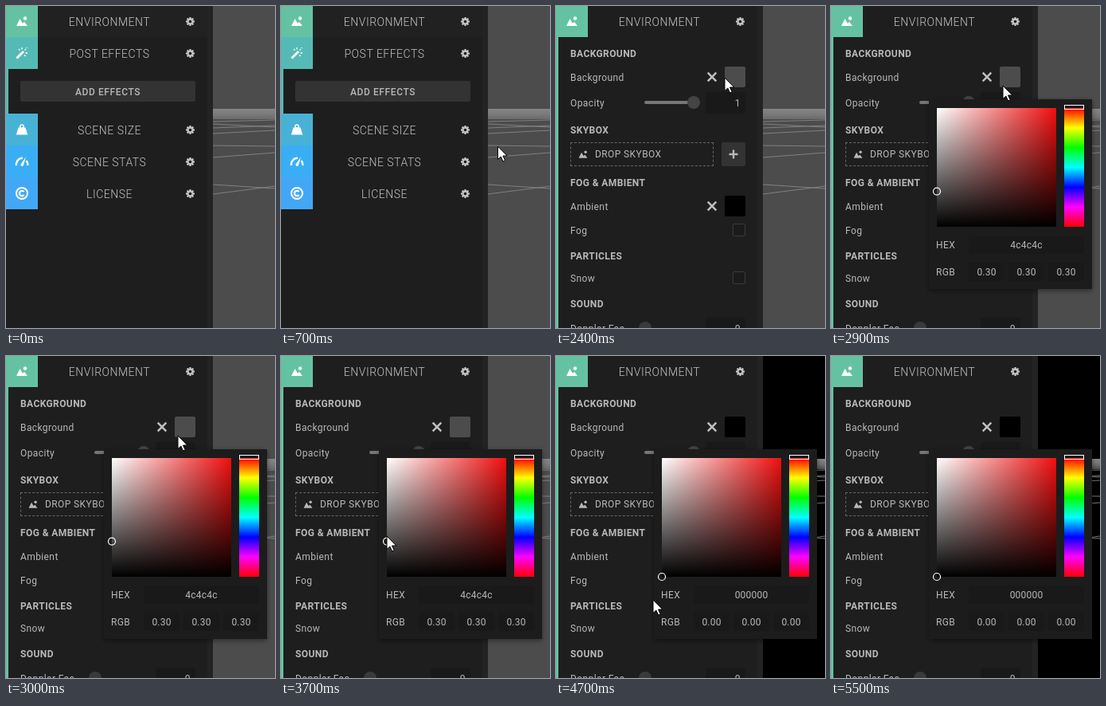
These frames come from a looping animation (338x404 px, 5900 ms). An HTML page:

```html
<!DOCTYPE html>
<html>
<head>
<meta charset="utf-8">
<style>
html, body { margin: 0; width: 100%; height: 100%; overflow: hidden; background: #1e1e1e; }
svg { display: block; }
text { font: 12px Roboto, sans-serif; letter-spacing: .4px; fill: #b8b8b8; }
.row { font-size: 14px; font-weight: 300; letter-spacing: .5px; text-anchor: middle; fill: #c4c4c4; }
.head { font-weight: 700; }
.btn { font-weight: 500; letter-spacing: .6px; text-anchor: middle; }
.num { text-anchor: middle; letter-spacing: .2px; }
.end { text-anchor: end; }
</style>
</head>
<body>
<svg id="stage" width="338" height="404" viewBox="0 0 338 404"></svg>
<script>
const LOOP = 5900, STEP = 100;

const rect = (x, y, w, h, fill, extra = '') =>
  `<rect x="${x}" y="${y}" width="${w}" height="${h}" fill="${fill}" ${extra}/>`;
const text = (x, y, str, cls = '', extra = '') =>
  `<text x="${x}" y="${y}" class="${cls}" ${extra}>${str}</text>`;
const line = (d, color, width, extra = '') =>
  `<path d="${d}" fill="none" stroke="${color}" stroke-width="${width}" ${extra}/>`;
const at = (x, y, body, scale = 1) =>
  `<g transform="translate(${x} ${y}) scale(${scale})">${body}</g>`;
const field = (x, y, w, h) => rect(x, y, w, h, '#191919', 'rx="2"');
const gradient = (id, axis, stops) =>
  `<linearGradient id="${id}" x1="0" y1="0" x2="${axis === 'x' ? 1 : 0}" y2="${axis === 'y' ? 1 : 0}">` +
  stops.map(([color, alpha = 1], i) =>
    `<stop offset="${i / (stops.length - 1)}" stop-color="${color}" stop-opacity="${alpha}"/>`).join('') +
  '</linearGradient>';

const teeth = [0, 45, 90, 135].map(a =>
  rect(-1.1, -5.5, 2.2, 3, '#c4c4c4', `transform="rotate(${a})"`) +
  rect(-1.1, 2.5, 2.2, 3, '#c4c4c4', `transform="rotate(${a})"`)).join('');
const gear = y => at(231.5, y + .5,
  '<circle r="3" fill="none" stroke="#c4c4c4" stroke-width="2.4"/>' + teeth);
const cross = y => line(`M190.7 ${y - 5.3}l10.6 10.6m0-10.6l-10.6 10.6`, '#c0c0c0', 2.5);
const checkbox = y => rect(222.5, y + .5, 15, 15, '#1b1b1b', 'rx="1.5" stroke="#3a3a3a"');

const peaks = color =>
  `<path d="M-7 6L-2.5-3L1 3L3 .8L7 6Z" fill="${color}"/><circle cx="4" cy="-3.5" r="2.2" fill="${color}"/>`;
const wand = line('M-6.5 6.5L2-2', '#fff', 3) +
  line('M3.5-3.5L5-5M0-7v2.5M-4-5l1.5 1.5M4.5 0h2.5M3 2.5l1.5 1.5M6-7v1', '#fff', 1.3);
const weight = '<path d="M-4.5-2.5H4.5L7.2 6.5H-7.2Z" fill="#fff"/>' +
  '<circle cy="-3.8" r="2.2" fill="none" stroke="#fff" stroke-width="1.6"/>';
const gauge = line('M-7 5A8 8 0 0 1 1-4.2M5.5-1A8 8 0 0 1 7.4 5', '#fff', 2.4) +
  '<path d="M-1.8 4L5-5.5L1.8 5.2Q-.5 7-1.8 4Z" fill="#fff"/>';
const copyright = '<circle r="7" fill="none" stroke="#fff" stroke-width="2"/>' +
  line('M2.6-2A3.2 3.2 0 1 0 2.6 2', '#fff', 2.3);

const row = (y, label, color, icon) =>
  rect(0, y, 40, 40, color) + at(20, y + 20, icon) + text(130, y + 26, label, 'row') + gear(y + 20);

const viewport =
  '<rect id="back" x="260" width="78" height="404"/>' +
  rect(260, 129, 78, 13, 'url(#haze)') +
  line('M260 145L338 143M260 148L338 152M260 153L338 150M260 160L338 156' +
       'M260 175L338 176M260 190L338 184M260 236L338 226M260 224L338 229', '#868686', .9);

const panel = rect(0, 0, 260, 404, '#1e1e1e') + rect(253, 0, 7, 404, '#232323');

const closed =
  rect(40, 0, 213, 39, '#212121') +
  row(-1, 'ENVIRONMENT', '#64c2a3', peaks('#fff')) +
  row(39, 'POST EFFECTS', '#55bab5', wand) +
  rect(0, 79, 3, 56, '#55bab5') +
  rect(18, 94, 220, 26, '#333', 'rx="2"') + text(128, 111.5, 'ADD EFFECTS', 'btn') +
  row(135, 'SCENE SIZE', '#48b2d6', weight) +
  row(175, 'SCENE STATS', '#3aaef4', gauge) +
  row(215, 'LICENSE', '#42a8f5', copyright);

const dropBox =
  line('M18 171.5H198M18 200.5H198', '#666', 1, 'stroke-dasharray="3 2.06"') +
  line('M18.5 171V201M197.5 171V201', '#666', 1, 'stroke-dasharray="3 2.4"');

const open =
  row(-1, 'ENVIRONMENT', '#64c2a3', peaks('#fff')) +
  rect(0, 39, 3, 365, '#64c2a3') +
  [['BACKGROUND', 64], ['SKYBOX', 160], ['FOG &amp; AMBIENT', 226], ['PARTICLES', 318], ['SOUND', 378]]
    .map(([s, y]) => text(18, y, s, 'head')).join('') +
  [['Background', 94], ['Opacity', 126], ['Ambient', 256], ['Fog', 286], ['Snow', 346], ['Doppler Fac', 409]]
    .map(([s, y]) => text(18, y, s)).join('') +
  cross(89) + '<rect id="swatch" x="212" y="76" width="26" height="26" rx="2"/>' +
  rect(111, 119, 62, 4, '#777', 'rx="2"') + '<circle cx="173" cy="121" r="8" fill="#444"/>' +
  field(188, 108, 50, 27) + text(232, 126, '1', 'end') +
  dropBox + at(34, 186, peaks('#b8b8b8'), .78) + text(49, 190, 'DROP SKYBOX') +
  rect(208, 171, 30, 30, '#333', 'rx="2"') + line('M217.5 186h11m-5.5-5.5v11', '#b8b8b8', 2.4) +
  cross(251) + rect(212, 238, 26, 26, '#000', 'rx="2"') +
  checkbox(273) + checkbox(333) +
  '<circle cx="112" cy="404" r="8" fill="#3a3a3a"/>' +
  field(188, 391, 50, 27) + text(232, 409, '0', 'end');

const picker =
  rect(123, 117, 205, 238, '#1c1c1c', 'filter="url(#shadow)"') +
  rect(133, 128, 150, 149, '#f00f0f') + rect(133, 128, 150, 149, 'url(#white)') +
  rect(133, 128, 150, 149, 'url(#black)') +
  rect(293, 128, 25, 149, 'url(#hue)') +
  rect(293.5, 124.5, 24, 5, 'none', 'stroke="#fff"') +
  '<circle id="ring" cx="133" r="4.5" fill="none" stroke="#fff" stroke-width="1.2"/>' +
  text(132, 304, 'HEX') + field(173, 288, 145, 23) + text(245.5, 304, '', 'num', 'id="hex"') +
  text(132, 338, 'RGB') +
  [173, 223, 273].map(x => field(x, 322, 45, 23) + text(x + 22.5, 338, '', 'num rgb')).join('');

const arrow = '<path id="arrow" d="M0 0V16.5L3.8 13L6.6 19L9.2 17.8L6.5 12H11.8Z" fill="#fff" stroke="#000"/>';
const hand = '<path id="hand" d="M-1.5 12V1.2Q-1.5-1 .5-1T2.5 1.2V6.5Q5 5.5 5.7 7.3Q8 6.6 8.6 8.6' +
  'Q10.8 8.2 10.8 10.5V15Q10.8 18 9 20V22.5H-1V20Q-4 17-6.6 12.6Q-7.3 10.4-5 10.2Q-3.5 10.3-1.5 12Z' +
  'M2.5 6.5V11M5.7 7.3V11M8.6 8.6V11.5" fill="#fff" stroke="#000"/>';

const stage = document.getElementById('stage');
stage.innerHTML = '<defs>' +
  gradient('haze', 'y', [['#858585'], ['#808080', .9], ['#808080', .6]]) +
  gradient('white', 'x', [['#fff'], ['#fff', 0]]) +
  gradient('black', 'y', [['#000', 0], ['#000']]) +
  gradient('hue', 'y', ['#f00', '#ff0', '#0f0', '#0ff', '#00f', '#f0f', '#f00'].map(c => [c])) +
  '<filter id="shadow"><feDropShadow dx="0" dy="2" stdDeviation="3" flood-opacity=".45"/></filter></defs>' +
  viewport + panel +
  `<g id="closed">${closed}</g><g id="open">${open}</g><g id="picker">${picker}</g>` +
  `<g id="cursor">${arrow}${hand}</g>`;

const el = Object.fromEntries([...stage.querySelectorAll('[id]')].map(e => [e.id, e]));
const channels = stage.querySelectorAll('.rgb');
const show = (node, on) => node.setAttribute('display', on ? 'inline' : 'none');

// time, pointer x, pointer y
const path = [
  [0, 350, 400], [100, 330, 372], [600, 300, 214], [1100, 162, 24], [1700, 162, 24],
  [2400, 212, 90], [2600, 216, 100], [3000, 216, 100], [3300, 195, 194], [3700, 133, 226],
  [3900, 132, 229], [4200, 118, 268], [4500, 108, 290], [5100, 150, 338], [5400, 165, 392],
  [5500, 170, 430], [LOOP, 170, 430]
];

function pointer(t) {
  const i = path.findIndex(p => p[0] > t);
  const [a, b] = [path[i - 1], path[i]];
  const k = (t - a[0]) / (b[0] - a[0]);
  return [1, 2].map(n => a[n] + (b[n] - a[n]) * k);
}

function draw(now) {
  const t = Math.floor(now % LOOP / STEP) * STEP;
  const opened = t >= 1500;
  const level = Math.round(76 - 45 * Math.min(76 / 45, Math.max(0, (t - 3900) / 300)));
  const hex = level.toString(16).padStart(2, '0').repeat(3);

  show(el.closed, !opened);
  show(el.open, opened);
  show(el.picker, t >= 2800);
  el.back.setAttribute('fill', '#' + hex);
  el.swatch.setAttribute('fill', '#' + hex);
  el.ring.setAttribute('cy', 277 - 149 * level / 255);
  el.hex.textContent = hex;
  channels.forEach(c => c.textContent = (level / 255).toFixed(2));

  const [x, y] = pointer(t);
  const overRow = x < 253 && (y < 40 || !opened && (y < 79 || y > 135 && y < 255));
  el.cursor.setAttribute('transform', `translate(${x} ${y})`);
  show(el.hand, overRow);
  show(el.arrow, !overRow);
  requestAnimationFrame(() => draw(performance.now() - start));
}

const start = performance.now();
draw(0);
</script>
</body>
</html>
```
